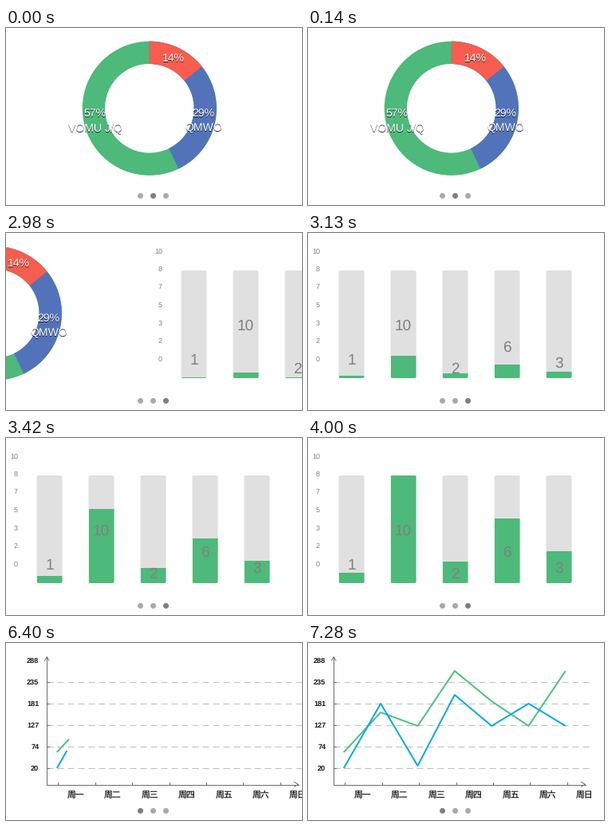
Recreate the animation shown at these times as a matplotlib script. Size 371 by 222 pixels, loop 8030 ms.

```python
import numpy as np
import matplotlib

matplotlib.rcParams["toolbar"] = "None"
matplotlib.rcParams["text.hinting"] = "none"

import matplotlib.pyplot as plt
from matplotlib.animation import FuncAnimation
from matplotlib.patches import Circle, FancyBboxPatch, Rectangle, Wedge
from matplotlib.transforms import Affine2D

W, H, DPI = 371, 222, 100
PX = 72 / DPI                      # points per pixel
LOOP, TICK = 8030, 22
PAGE_W = 375
GROW_MS = 970

BACK, GREEN, RED, BLUE = "#fefefe", "#4db97a", "#f65d4e", "#5273ba"
TRACK, GREY, DOT_OFF, DOT_ON = "#e0e0e0", "#808080", "#aaaaaa", "#7f7f7f"

# Moments at which the picture is refreshed, held in between
STAMPS = np.array([0, 2830, 2980, 3130, 3280, 3420, 3570, 3710, 3860, 4000,
                   6100, 6250, 6400, 6540, 6690, 6840, 6980, 7130, 7280])

fig = plt.figure(figsize=(W / DPI, H / DPI), dpi=DPI, facecolor=BACK)
ax = fig.add_axes([0, 0, 1, 1])
ax.set_xlim(0, W)
ax.set_ylim(H, 0)
ax.axis("off")


class Page:
    """A group of artists that slides sideways as one."""

    def __init__(self):
        self.shift = Affine2D()
        self.transform = self.shift + ax.transData
        self.artists = []

    def patch(self, patch):
        patch.set_transform(self.transform)
        ax.add_patch(patch)
        self.artists.append(patch)
        return patch

    def line(self, xs, ys, color, width=1.0, **kw):
        item, = ax.plot(xs, ys, color=color, lw=width * PX,
                        transform=self.transform, **kw)
        self.artists.append(item)
        return item

    def text(self, x, y, s, size, color, ha="center", rise=0.36,
             family="Liberation Sans", **kw):
        self.artists.append(ax.text(
            x, y + rise * size, s, fontsize=size * PX, color=color, ha=ha,
            va="baseline", family=family, transform=self.transform, **kw))

    def move(self, x):
        self.shift.clear().translate(x, 0)
        for item in self.artists:
            item.set_visible(-W < x < W + 10)


def build_ring():
    page = Page()
    # Each sector starts at the top and covers the longer one below it
    for sevenths, color in ((7, GREEN), (3, BLUE), (1, RED)):
        page.patch(Wedge((179.8, 100.8), 84.1, -90, 360 * sevenths / 7 - 90,
                         width=28.3, fc=color, lw=0))
    for x, y, s in ((210, 36.5, "14%"), (247.5, 105.5, "29%"),
                    (247.5, 124.5, "QMWO"), (111.5, 105.5, "57%"),
                    (111.5, 124.5, "VOMU J/Q")):
        page.text(x, y + 1, s, 14, "black", alpha=0.85)
        page.text(x, y, s, 14, "white")
    return page


def build_bars():
    page, fills = Page(), []
    for i, s in enumerate((10, 8, 7, 5, 3, 2, 0)):
        page.text(15, 22.2 + 22.5 * i, str(s), 9, GREY, ha="right")
    for i, value in enumerate((1, 10, 2, 6, 3)):
        x = 38.5 + 65 * i
        track = page.patch(FancyBboxPatch(
            (x, 47), 32, 135, boxstyle="round,pad=0,rounding_size=2",
            fc=TRACK, lw=0))
        fill = page.patch(Rectangle((x, 182), 32, 0, fc=GREEN, lw=0))
        fill.set_clip_path(track)
        fills.append((fill, 13.5 * value))
        y = min(182 - 6.75 * value, 168.5) if value > 1 else 158
        page.text(x + 16, y + 0.4, str(value), 19, GREY)
    return page, fills


def build_lines():
    page = Page()
    axis, ink = "#6e6e6e", "#1c1c1c"
    for i, s in enumerate((288, 235, 181, 127, 74, 20)):
        y = 22 + 27 * i
        page.text(22.3, y, str(s), 9.2, ink, ha="right", weight="bold")
        if i:
            page.line([32, 352], [y - 0.2] * 2, "#bdbdbd",
                      linestyle=(0, (8, 5)), dash_capstyle="butt")
            page.line([32, 35], [y - 0.2] * 2, axis)
    page.line([32, 32, 347.5], [17.5, 177.7, 177.7], axis)
    page.line([29.5, 32.3, 35], [22, 17.5, 22], axis)
    page.line([342.5, 347.5, 342.5], [174.5, 177.4, 180], axis)
    for i, day in enumerate("一二三四五六日"):
        x = 46.3 + 46.4 * i
        page.line([x, x], [175, 177.7], axis)
        page.text(x + 22.4, 189.5, "周" + day, 10.8, ink, rise=0.38,
                  family="Noto Sans CJK JP", weight="medium")
    xs = 44.8 + 46.33 * np.arange(7)
    curves = []
    for color, ys in (("#4dc47d", (137, 87, 104, 35, 73, 104, 35)),
                      ("#06a9ee", (157, 76, 154, 65, 104, 76, 104))):
        ys = np.array(ys)
        item = page.line([], [], color, 2, solid_joinstyle="round",
                         solid_capstyle="butt")
        dist = np.append(0, np.cumsum(np.hypot(np.diff(xs), np.diff(ys))))
        curves.append((item, xs, ys, dist / dist[-1]))
    return page, curves


ring = build_ring()
bars, fills = build_bars()
chart, curves = build_lines()
pages = (ring, bars, chart)
dots = [ax.add_patch(Circle((168.5 + 16 * i, 210.5), 3.5, lw=0, zorder=5))
        for i in range(3)]

U = np.linspace(0, 1, 400)
EASE_X = 3 * (1 - U) ** 2 * U * 0.42 + 3 * (1 - U) * U ** 2 * 0.58 + U ** 3
EASE_Y = 3 * U ** 2 - 2 * U ** 3


def ease(p):
    return np.interp(p, EASE_X, EASE_Y)


def scroll(t):
    first = np.interp(t, [2740, 2830, 2980, 3130], [0, 95, 194, PAGE_W])
    second = np.interp(t, [6080, 6100, 6250, 6400, 6540],
                       [0, 12, 195, 356, PAGE_W])
    return first + second


def draw(i):
    # A refresh that falls within this tick already counts
    now = (i + 1) * TICK - 1
    t = STAMPS[STAMPS <= now][-1]

    offset = scroll(t)
    for k, page in enumerate(pages):
        page.move(k * PAGE_W - offset)
    active = (int(round(offset / PAGE_W)) + 1) % 3
    for k, dot in enumerate(dots):
        dot.set_facecolor(DOT_ON if k == active else DOT_OFF)

    # Bars stand full until their page takes over, then grow anew
    grow = ease((t - 2826) / GROW_MS) if t >= 2980 else 1
    for fill, full in fills:
        fill.set_y(182 - full * grow)
        fill.set_height(full * grow)

    p = ease((t - 6239) / GROW_MS)
    for item, xs, ys, part in curves:
        done = part < p
        item.set_data(np.append(xs[done], np.interp(p, part, xs)),
                      np.append(ys[done], np.interp(p, part, ys)))
    return []


anim = FuncAnimation(fig, draw, frames=LOOP // TICK, interval=TICK,
                     init_func=lambda: draw(0), repeat=True, repeat_delay=0,
                     blit=False)
plt.show()
```
